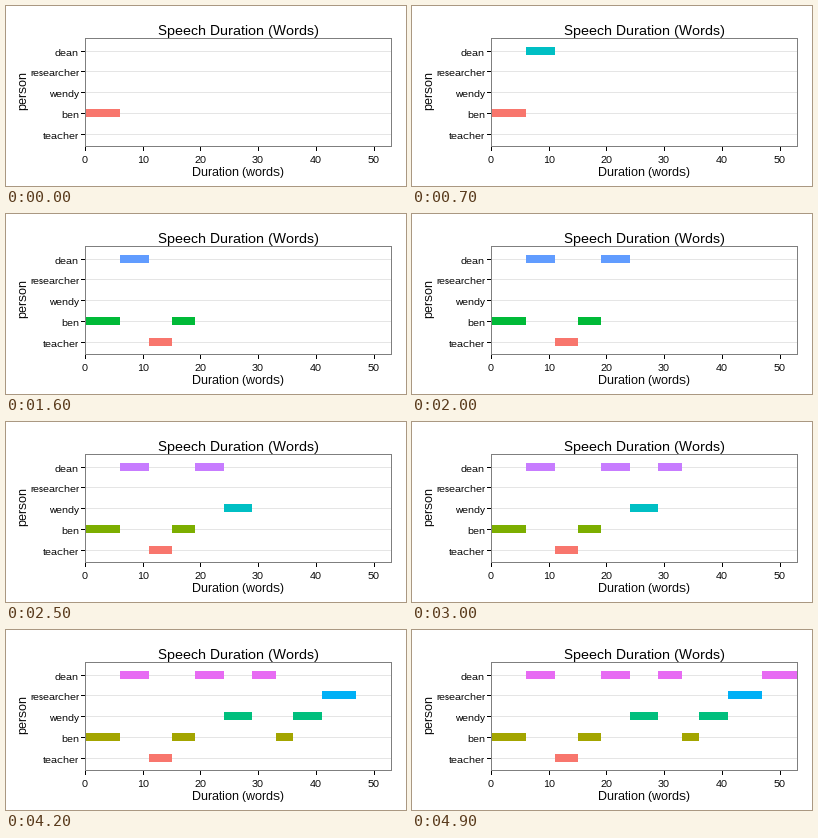
Animation, 400 px wide and 180 px high, one loop 5.6 s. Source, as a matplotlib script:

```python
import math

import matplotlib.pyplot as plt
from matplotlib.animation import FuncAnimation
from matplotlib.patches import Rectangle

plt.rcParams.update({
    "font.family": "Liberation Sans",
    "text.hinting": "native",
    "text.hinting_factor": 1,
})

W, H, DPI = 400, 180, 100
STEP, LOOP = 100, 5600  # ms

LEFT, RIGHT, TOP, BOTTOM = 79, 385, 32, 140
TOTAL_WORDS = 53
BAR_HEIGHT = 8

PEOPLE = ["dean", "researcher", "wendy", "ben", "teacher"]  # top to bottom
TURNS = [  # start in ms, speaker, words
    (0, "ben", 6), (700, "dean", 5), (1200, "teacher", 4), (1600, "ben", 4),
    (2000, "dean", 5), (2500, "wendy", 5), (3000, "dean", 4),
    (3400, "ben", 3), (3700, "wendy", 5), (4200, "researcher", 6),
    (4900, "dean", 6),
]
# Evenly spaced hues, by number of people who have spoken
PALETTES = {
    1: ["#F8766D"],
    2: ["#F8766D", "#00BFC4"],
    3: ["#F8766D", "#00BA38", "#619CFF"],
    4: ["#F8766D", "#7CAE00", "#00BFC4", "#C77CFF"],
    5: ["#F8766D", "#A3A500", "#00BF7D", "#00B0F6", "#E76BF3"],
}

fig = plt.figure(figsize=(W / DPI, H / DPI), dpi=DPI, facecolor="white")
ax = fig.add_axes([0, 0, 1, 1])
ax.set(xlim=(0, W), ylim=(H, 0))
ax.axis("off")


def x_at(words):
    return math.floor(LEFT + 0.5 + words * (RIGHT - LEFT) / TOTAL_WORDS)


def y_at(person):
    unit = (BOTTOM - TOP) / 5.2
    return math.floor(TOP + 0.6 + unit * (0.6 + PEOPLE.index(person)))


def box(x, y, w, h, color, z):
    return ax.add_patch(Rectangle((x, y), w, h, facecolor=color, linewidth=0,
                                  antialiased=False, zorder=z))


def label(x, y, text, px, **kw):
    kw = {"ha": "center", "va": "baseline", **kw}
    ax.text(x, y, text, fontsize=px * 72 / DPI, color="black", **kw)


for person in PEOPLE:
    y = y_at(person)
    box(LEFT, y, RIGHT - LEFT, 1, "#E5E5E5", 1)
    box(LEFT - 4, y, 4, 1, "black", 3)
    label(73, y + 5, person, 10, ha="right")

for words in range(0, 51, 10):
    x = x_at(words)
    box(x, BOTTOM + 1, 1, 4, "black", 3)
    label(x, 157, str(words), 10)

for y in (TOP, BOTTOM):
    box(LEFT, y, RIGHT - LEFT + 1, 1, "#7F7F7F", 4)
for x in (LEFT, RIGHT):
    box(x, TOP, 1, BOTTOM - TOP + 1, "#7F7F7F", 4)

label(232, 29, "Speech Duration (Words)", 14)
label(232, 170, "Duration (words)", 12)
label(17, 85, "person", 12, rotation=90, va="center")

bars = []
spoken = 0
for _, person, words in TURNS:
    x0, x1 = x_at(spoken), x_at(spoken + words)
    bars.append(box(x0, y_at(person) - BAR_HEIGHT // 2, x1 - x0, BAR_HEIGHT,
                    "white", 2))
    spoken += words


def update(frame):
    now = frame * STEP
    active = {person for start, person, _ in TURNS if start <= now}
    order = [p for p in reversed(PEOPLE) if p in active]
    colors = dict(zip(order, PALETTES[len(order)]))
    for bar, (start, person, _) in zip(bars, TURNS):
        bar.set_visible(start <= now)
        if start <= now:
            bar.set_facecolor(colors[person])
    return bars


anim = FuncAnimation(fig, update, frames=LOOP // STEP, interval=STEP,
                     repeat=True, repeat_delay=0, blit=False)
plt.show()
```
